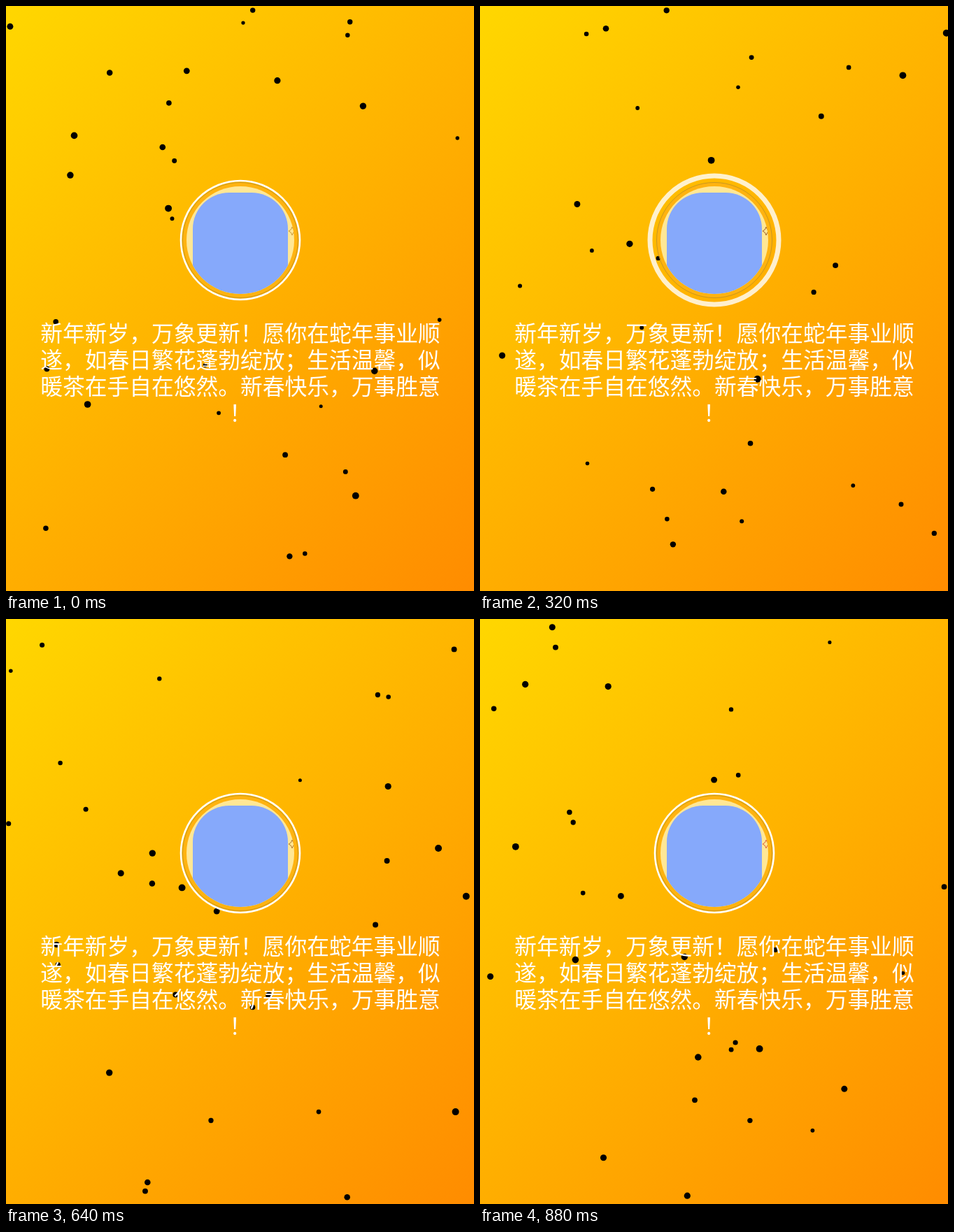
Write an HTML page that moves like this. It is 669 px wide and 837 px high and loops after 960 ms.

```html
<!DOCTYPE html>
<html lang="zh-CN">
<head>
<meta charset="utf-8">
<title>新年祝福</title>
<style>
  html, body { margin: 0; width: 100%; height: 100%; overflow: hidden; }
  body { background: linear-gradient(135deg, #ffd700, #ff8c00); }
  svg { display: block; width: 669px; height: 837px; }
  text {
    font: 350 31.76px "Noto Sans CJK SC", "Noto Sans CJK", sans-serif;
    fill: #fff;
    text-anchor: middle;
  }
</style>
</head>
<body>
<svg viewBox="0 0 669 837" xmlns="http://www.w3.org/2000/svg">
  <defs>
    <clipPath id="disc"><circle cx="335" cy="335" r="77"/></clipPath>
  </defs>
  <g id="dots"></g>
  <circle cx="335" cy="335" r="82" fill="#ffb310"/>
  <circle cx="335" cy="335" r="82.5" fill="none" stroke="#b98d2c" stroke-width=".8"/>
  <circle id="ring" cx="335" cy="335" fill="none" stroke="#fff"/>
  <g clip-path="url(#disc)">
    <rect x="258" y="258" width="154" height="154" fill="#ffe795"/>
    <rect x="267" y="267" width="136" height="180" rx="52" fill="#86a9fb"/>
    <path id="spark" d="M409 316q1 5 5 6q-4 1-5 6q-1-5-5-6q4-1 5-6z" fill="none"/>
  </g>
  <g id="words"></g>
</svg>
<script>
const NS = "http://www.w3.org/2000/svg";
const LOOP = 960, STEP = 80, COUNT = 32;
const W = 669, H = 837;
const lines = [
  "新年新岁，万象更新！愿你在蛇年事业顺",
  "遂，如春日繁花蓬勃绽放；生活温馨，似",
  "暖茶在手自在悠然。新春快乐，万事胜意",
  "！"
];
const sparkColors = ["#c99a3c", "#c99a3c", "#a0612c", "#a0612c", "#b07a35", "#e0623c"];

const byId = id => document.getElementById(id);

function set(el, attrs) {
  for (const key in attrs) el.setAttribute(key, attrs[key]);
  return el;
}

function add(parent, tag, attrs = {}) {
  return parent.appendChild(set(document.createElementNS(NS, tag), attrs));
}

function random(seed) {
  return () => {
    seed = (seed + 0x6d2b79f5) | 0;
    let n = Math.imul(seed ^ (seed >>> 15), 1 | seed);
    n = (n + Math.imul(n ^ (n >>> 7), 61 | n)) ^ n;
    return ((n ^ (n >>> 14)) >>> 0) / 4294967296;
  };
}

lines.forEach((line, i) => {
  add(byId("words"), "text", { x: 335, y: 480 + i * 38.15 }).textContent = line;
});

const dots = Array.from({ length: COUNT }, () => add(byId("dots"), "circle"));

// Every step scatters the dots afresh.
function scatter(step) {
  const next = random(2025 + step * 977);
  for (const dot of dots) {
    set(dot, {
      cx: (next() * W).toFixed(1),
      cy: (next() * H).toFixed(1),
      r: (2.5 + next() * 2.5).toFixed(2)
    });
  }
}

function draw(time) {
  const step = Math.floor((time % LOOP) / STEP);
  const wide = step >= 4 && step < 8;
  scatter(step);
  set(byId("ring"), {
    r: wide ? 92 : 85,
    "stroke-width": wide ? 7 : 2.6,
    "stroke-opacity": wide ? 0.8 : 1
  });
  set(byId("spark"), { stroke: sparkColors[step >> 1] });
}

function tick() {
  draw(performance.now());
  requestAnimationFrame(tick);
}
tick();
</script>
</body>
</html>
```
